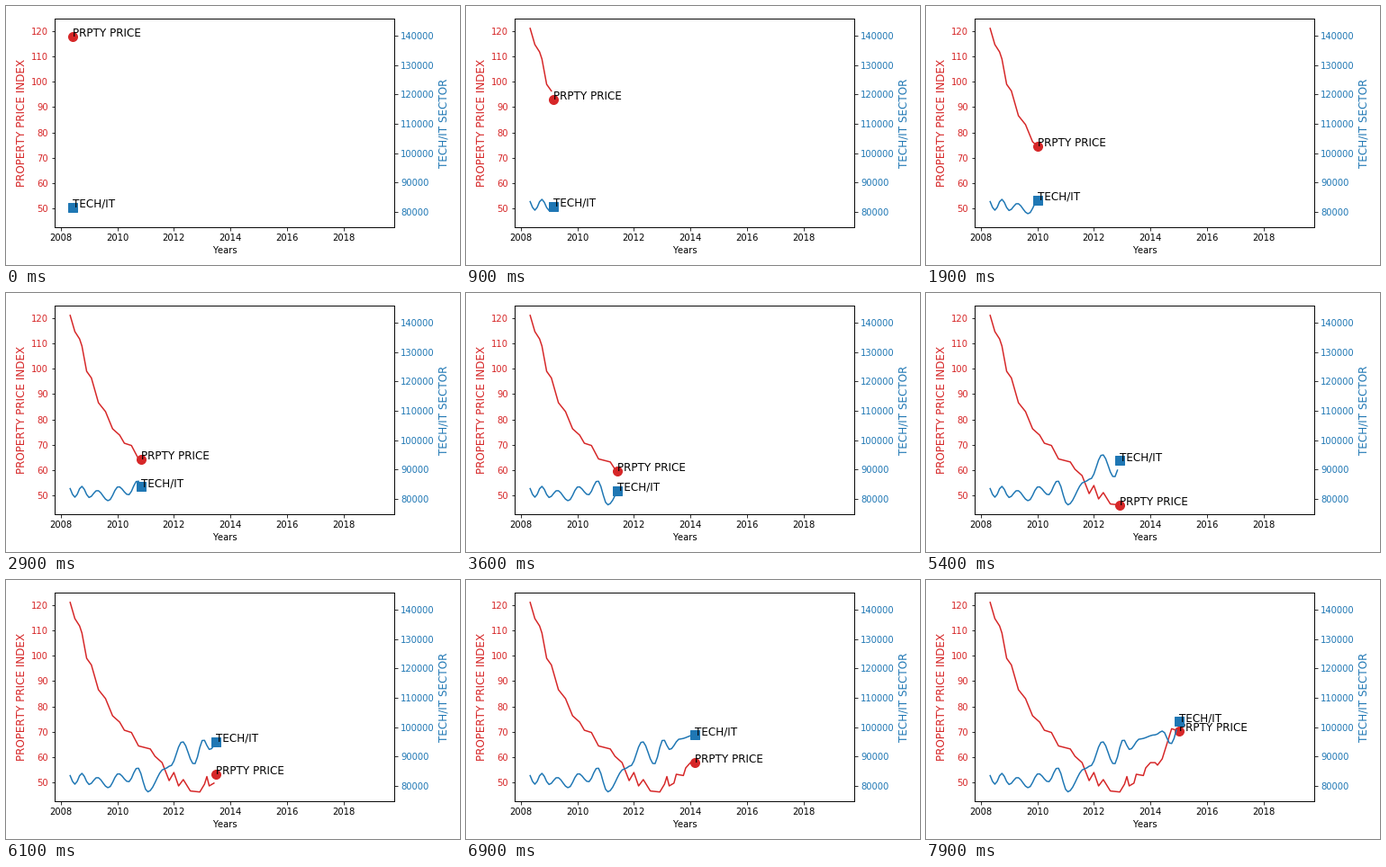
These frames come from a looping animation (504x288 px, 8 s). A matplotlib script:

```python
import numpy as np
import matplotlib.pyplot as plt
from matplotlib.animation import FuncAnimation

W, H, DPI = 504, 288, 72
FRAMES = 80
RED, BLUE = "tab:red", "tab:blue"

plt.rcParams["font.family"] = "DejaVu Sans"
plt.rcParams["text.kerning_factor"] = 6  # whole-pixel kerning

months = np.arange(FRAMES + 1)
years = 2008 + (4 + months) / 12  # monthly from May 2008

# Corners of the price index: (month, value)
PRICE_KEYS = [
    (0, 121.1), (2, 114.7), (4, 111.8), (5, 109), (7, 99), (9, 96.4),
    (12, 86.6), (15, 83.1), (18, 76.3), (21, 73.8), (23, 70.6), (26, 69.7),
    (29, 64.4), (34, 63.2), (36, 60.3), (39, 57.8), (42, 50.7), (44, 53.9),
    (46, 48.6), (48, 51.1), (51, 46.6), (55, 46.2), (57, 49.3), (58, 52.3),
    (59, 48.6), (61, 49.7), (62, 53.2), (65, 52.7), (66, 55.7), (68, 57.8),
    (70, 57.8), (71, 56.8), (73, 59.3), (77, 71.2), (80, 70.3)]

# Turning points of the sector curve: (month, thousands)
SECTOR_KEYS = [
    (-1, 84.5), (2, 80.6), (4.9, 84.3), (8.1, 80.5), (11.5, 82.9),
    (16.2, 79.4), (20.5, 84.2), (24.7, 81.4), (28.6, 86.2), (32.9, 78),
    (40, 85.8), (42.5, 86.8), (47.6, 95.1), (52.6, 87.4), (56.5, 95.8),
    (59.2, 92.4), (63.5, 96), (70, 97.4), (73.2, 98.7), (76.6, 94.3),
    (81.5, 104)]


def linear(keys):
    return np.interp(months, *zip(*keys))


def wave(keys):
    """Cosine easing from each turning point to the next."""
    at, value = np.array(keys).T
    pos = np.interp(months, at, np.arange(len(at)))
    i = pos.astype(int)
    ease = (1 - np.cos(np.pi * (pos - i))) / 2
    return value[i] + (value[i + 1] - value[i]) * ease


fig = plt.figure(figsize=(W / DPI, H / DPI), dpi=DPI, facecolor="white")
left, right, top, bottom = 54, 431, 14, 246
ax = fig.add_axes([left / W, 1 - bottom / H, (right - left) / W, (bottom - top) / H])
twin = ax.twinx()

ax.set_xlim(2007.785, 2019.791)
ax.set_xticks(range(2008, 2019, 2))
ax.set_xlabel("Years", fontsize=10)


def style(axis, label, color, limits, ticks):
    axis.set_ylim(*limits)
    axis.set_yticks(ticks)
    axis.set_ylabel(label, color=color, fontsize=12)
    axis.tick_params(axis="y", labelcolor=color)


style(ax, "PROPERTY PRICE INDEX", RED, (42.55, 124.97), range(50, 121, 10))
style(twin, "TECH/IT SECTOR", BLUE, (74800, 145820), range(80000, 140001, 10000))


class Series:
    """A growing line led by a marker and a caption."""

    def __init__(self, axis, values, color, marker, name):
        self.values = values
        self.line, = axis.plot([], [], color=color, lw=1.5)
        self.head, = axis.plot([], [], color=color, marker=marker, ms=10)
        self.caption = axis.text(years[0], values[0], name, fontsize=12)
        self.artists = [self.line, self.head, self.caption]

    def show(self, i):
        self.line.set_data(years[:i + 1], self.values[:i + 1])
        x, y = years[i + 1], self.values[i + 1]
        self.head.set_data([x], [y])
        self.caption.set_position((x, y))
        return self.artists


series = [
    Series(ax, linear(PRICE_KEYS), RED, "o", "PRPTY PRICE"),
    Series(twin, 1000 * wave(SECTOR_KEYS), BLUE, "s", "TECH/IT"),
]


def update(i):
    return [artist for s in series for artist in s.show(i)]


anim = FuncAnimation(fig, update, frames=FRAMES, interval=100,
                     repeat=True, repeat_delay=0, blit=False)
plt.show()
```
